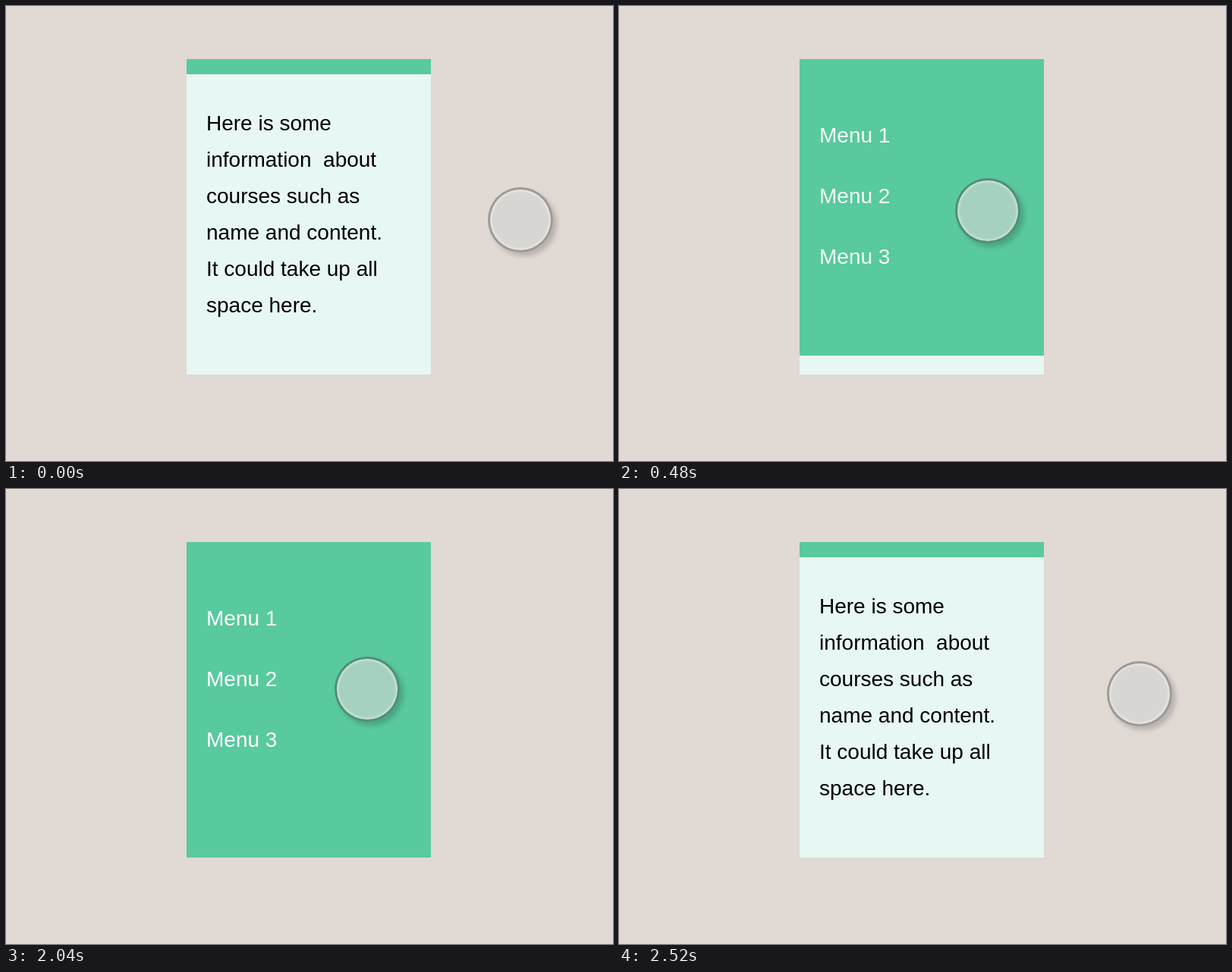
Write an HTML page that moves like this. It is 800 px wide and 600 px high and loops after 3060 ms.

```html
<!DOCTYPE html>
<html lang="en">
<head>
<meta charset="utf-8">
<title>Pull-down menu</title>
<style>
  html, body { margin: 0; width: 100%; height: 100%; overflow: hidden; background: #e0d9d4; }
  #stage { position: absolute; left: 0; top: 0; width: 800px; height: 600px; overflow: hidden; }
  svg { position: absolute; left: 0; top: 0; }
  text { font: 28px "Liberation Sans", Arial, Helvetica, sans-serif; white-space: pre; }
  #menu { fill: #fff; }
  #pointer {
    position: absolute; left: -43px; top: -43px; width: 86px; height: 86px;
    box-sizing: border-box; border-radius: 50%;
    border: 3px solid rgba(70, 68, 66, .42);
    background: rgba(211, 213, 211, .63) padding-box;
    box-shadow: 5px 5px 6px rgba(0, 0, 0, .18), inset 0 0 3px 2px rgba(255, 255, 255, .45);
  }
</style>
</head>
<body>
<div id="stage">
  <svg width="800" height="600">
    <rect x="238" y="70" width="322" height="416" fill="#e7f7f4"/>
    <g id="copy"></g>
    <rect id="panel" x="238" y="70" width="322" height="20" fill="#59c99e"/>
    <g id="menu" opacity="0"></g>
  </svg>
  <div id="pointer"></div>
</div>
<script>
  const LOOP = 3060, STEP = 20;
  const CLOSED = 20, OPEN = 416;
  const $ = id => document.getElementById(id);

  const mix = (a, b, k) => a + (b - a) * k;
  const phase = (t, from, to) => Math.min(1, Math.max(0, (t - from) / (to - from)));
  const easeOut = (u, power) => 1 - (1 - u) ** power;
  const sCurve = (u, power, bias) => u ** power / (u ** power + bias * (1 - u) ** power);

  // The CSS "ease" curve, solved by bisection.
  function ease(u) {
    const curve = (s, p1, p2) => 3 * p1 * s * (1 - s) ** 2 + 3 * p2 * s * s * (1 - s) + s ** 3;
    let low = 0, high = 1;
    for (let i = 0; i < 20; i++) {
      const mid = (low + high) / 2;
      if (curve(mid, .25, .25) < u) low = mid; else high = mid;
    }
    return curve(high, .1, 1);
  }

  function pointerAt(t) {
    if (t < 1840) {
      const u = phase(t, 80, 660);
      return [mix(678, 460, easeOut(u, 1.82)), mix(282, 264, u ** 1.2)];
    }
    const u = phase(t, 1840, 2520);
    return [mix(460, 686, sCurve(u, 3.05, .88)), mix(264, 270, u ** 2.5)];
  }

  function openAt(t) {
    return t < 1840
      ? ease(phase(t, 272, 572))
      : 1 - easeOut(phase(t, 2180, 2420), 3.3);
  }

  function addLines(group, lines, y, gap) {
    lines.forEach((line, i) => {
      const el = document.createElementNS("http://www.w3.org/2000/svg", "text");
      el.setAttribute("x", 264);
      el.setAttribute("y", y + i * gap);
      el.textContent = line;
      group.append(el);
    });
  }

  addLines($("copy"), [
    "Here is some", "information\u00a0 about", "courses such as",
    "name and content.", "It could take up all", "space here."
  ], 164, 48);
  addLines($("menu"), ["Menu 1", "Menu 2", "Menu 3"], 180, 80);

  function draw(now) {
    const t = Math.floor(now % LOOP / STEP) * STEP;
    const open = openAt(t);
    const [x, y] = pointerAt(t).map(Math.round);
    $("panel").setAttribute("height", Math.round(mix(CLOSED, OPEN, open)));
    $("menu").setAttribute("opacity", open);
    $("pointer").style.transform = `translate(${x}px, ${y}px)`;
  }

  const start = performance.now();
  function tick() {
    draw(performance.now() - start);
    requestAnimationFrame(tick);
  }
  tick();
</script>
</body>
</html>
```
